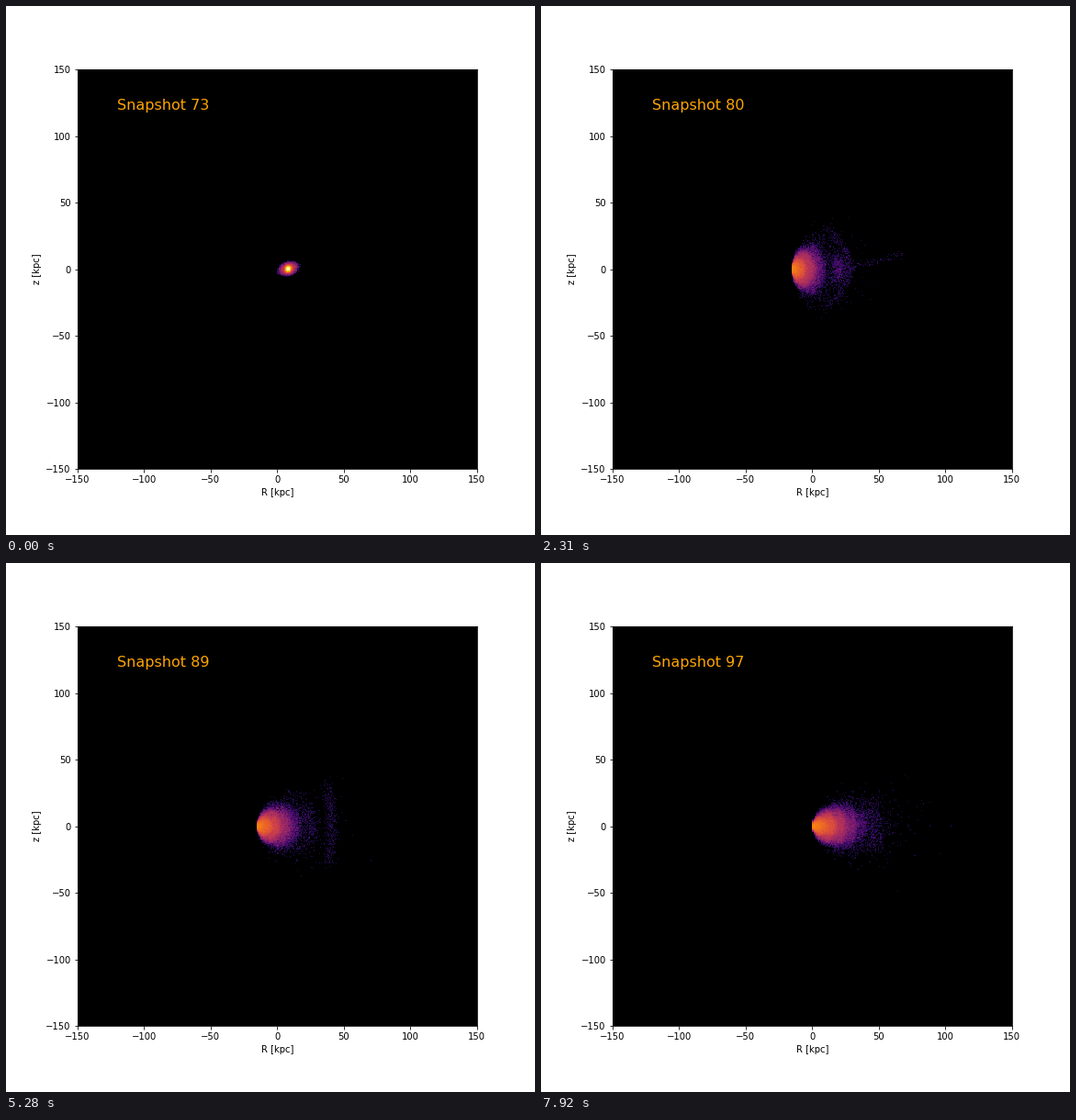
Recreate the animation shown at these times as a matplotlib script. Size 576 by 576 pixels, loop 8000 ms.

```python
import numpy as np
import matplotlib.pyplot as plt
from matplotlib.animation import FuncAnimation

FIRST, LAST = 73, 97
HOLD = 330            # ms per snapshot
LOOP, STEP = 8000, 40
DEPTH = 8.0           # log range of the colour scale
GRAIN = 1.5           # counts carried by one particle

edges = np.linspace(-150, 150, 401)
mid = (edges[:-1] + edges[1:]) / 2
X, Z = np.meshgrid(mid, mid)


def bump(s, centre, width):
    return np.exp(-((s - centre) / width) ** 2)


def decay(s, start, span):
    return np.exp(-max(s - start, 0) / span)


def left_edge(s):
    """The inner edge swings out to the left and back once."""
    return -23 * np.sin(np.pi * (s - 76) / 17) if 76 < s < 93 else 0.0


def draws(seed, count):
    """Fixed particles: position along a path in -1..1 and two offsets."""
    rng = np.random.default_rng(seed)
    u, g = rng.uniform(-1, 1, 1200), rng.normal(size=(2, 1200))
    n = int(count)
    return u[:n], g[0, :n], g[1, :n]


# ---- main body, as brightness on the log scale ----

def blob():
    """Compact tilted clump."""
    a = np.radians(17)
    dx, dz = X - 8.3, Z - 0.4
    u = dx * np.cos(a) + dz * np.sin(a)
    w = dz * np.cos(a) - dx * np.sin(a)
    d = np.hypot(u / 8.2, w / 5.2)
    core = 0.33 * np.exp(-((X - 8) / 1.9) ** 2 - (Z / 3.0) ** 2)
    return 0.76 - 0.5 * d - 0.9 * np.clip(d - 0.95, 0, None) + core


def ringed(size, x0):
    """Half disc with a bright outer ring."""
    x, z = (X - x0) / size, Z / size
    e = np.hypot((x - 6) / 15, z / 19)
    ring = 0.13 * np.exp(-((e - 0.88) / 0.1) ** 2)
    disc = 0.15 * np.clip((1.05 - np.hypot(x / 12, z / 14)) * 5, 0, 1)
    bar = 0.12 * np.exp(-(z / 3) ** 2) * np.clip((12 - x) / 4, 0, 1)
    v = 0.36 + ring + disc + bar + 0.25 * (1 - size)
    return v - 2.5 * np.clip(e - 0.98, 0, None)


def fan(s, x0):
    """Nested ellipses that share their left tip, with a sparse rim."""
    length = 21 + 0.78 * (s - 76)
    height = 15 + 4 * decay(s, 76, 5)
    R = X - x0 + 0.5
    r = np.maximum(R, 0.2) / (length / 2)
    t = (r ** 2 + (Z / height) ** 2) / (2 * r)
    bands = 0.02 * np.cos(2 * np.pi * np.hypot(R, Z) / 8) * (t > 0.4)
    rim = 0.16 * np.exp(-4 * np.clip(t - 1, 0, 50))
    return np.maximum(0.73 - 0.52 * t ** 1.4 + bands, rim)


def body(s, x0):
    if s == FIRST:
        return blob()
    mix = np.clip((s - 76) / 3, 0, 1)
    size = min(1, 0.6 + 0.2 * (s - 74))
    return (1 - mix) * ringed(size, x0) + mix * fan(max(s, 76), x0)


# ---- loose particles, as x and z positions ----

def tail(s, x0):
    """Stream leaving the body, swinging from below to above the axis."""
    u, g, h = draws(1, 900 * bump(s, 75.6, 2.8))
    along = ((u + 1) / 2) ** 1.4
    slope = -0.22 + 0.13 * (s - 76)
    reach = 42 * min(1, (s - 73) / 3)
    thick = 3.2 - 0.4 * max(s - 76, 0)
    start = 20 + 2 * max(s - 76, 0)
    return start + reach * along + g, slope * reach * along + thick * h


def loop(s, x0):
    """Expanding ring below the tail."""
    u, g, h = draws(2, 380 * bump(s, 76, 1.2))
    k, a = (s - 74) / 2, np.pi * u
    x = 50 + 23 * k * np.cos(a) + 3 * g
    return x, -22 - 14 * k * np.sin(a) - 0.25 * (x - 50) + 3 * h


def shell(seed, count, apex, bend, zc, half, spread):
    """Arc that bulges to the right."""
    u, g, h = draws(seed, count)
    return apex - bend * u ** 2 + spread * g, zc + half * u + spread * h


def first_shell(s, x0):
    turn = s - 84
    apex = x0 + 61 - (1.1 * turn ** 2 if turn < 0 else turn)
    fade = decay(s, 89, 4)
    return shell(3, 130 + 220 * fade, apex, 18 * decay(s, 80, 5),
                 15 * bump(s, 84.5, 3), 18 + 12 * fade, 1.6 + 0.1 * (s - 80))


def second_shell(s, x0):
    return shell(4, 180 + 420 * decay(s, 80, 1.5), x0 + 36 + 0.5 * (s - 80),
                 3, 0, 8 + 0.5 * (s - 80), 3)


def debris(s, x0):
    return shell(5, 120 * bump(s, 93, 1.8), 62 + 3.2 * (s - 89), 4, 20, 20,
                 2 + 0.3 * abs(s - 93))


def halo(s, x0):
    u, g, h = draws(6, 130)
    reach = 40 + 4 * abs(s - 84)
    return reach * (0.6 + 0.18 * g), reach * 0.28 * h


# (path, first snapshot, last snapshot, counts per particle)
PARTS = [(tail, 74, 81, 2), (loop, 75, 78, 2), (first_shell, 78, LAST, GRAIN),
         (second_shell, 79, LAST, GRAIN), (debris, 89, LAST, GRAIN),
         (halo, 74, LAST, 0.25)]


def density(s):
    x0 = left_edge(s)
    rng = np.random.default_rng(s)
    lam = np.expm1(DEPTH * np.clip(body(s, x0), 0, 1.05))
    counts = GRAIN * rng.poisson(lam / GRAIN)
    for path, begin, end, grain in PARTS:
        if begin <= s <= end:
            x, z = path(s, x0)
            counts += grain * np.histogram2d(z, x, bins=(edges, edges))[0]
    empty = (X < x0) | (counts == 0)
    return np.ma.masked_array(np.log1p(counts) / DEPTH, empty)


maps = [density(s) for s in range(FIRST, LAST + 1)]

fig = plt.figure(figsize=(8, 8), dpi=72, facecolor="white")
ax = fig.add_axes([0.135, 0.125, 0.755, 0.755], facecolor="black")
img = ax.imshow(maps[0], cmap="inferno", vmin=0, vmax=1, origin="lower",
                extent=(-150, 150, -150, 150), interpolation="nearest",
                aspect="auto")
ticks = np.arange(-150, 151, 50)
ax.set_xticks(ticks)
ax.set_yticks(ticks)
ax.set_xlabel("R [kpc]")
ax.set_ylabel("z [kpc]")
label = ax.text(-120, 120, "", color="orange", fontsize=16)


def update(i):
    k = min((i * STEP + STEP - 1) // HOLD, LAST - FIRST)
    img.set_data(maps[k])
    label.set_text(f"Snapshot {FIRST + k}")
    return img, label


anim = FuncAnimation(fig, update, frames=LOOP // STEP, interval=STEP,
                     repeat=True, repeat_delay=0, blit=False)
plt.show()
```
